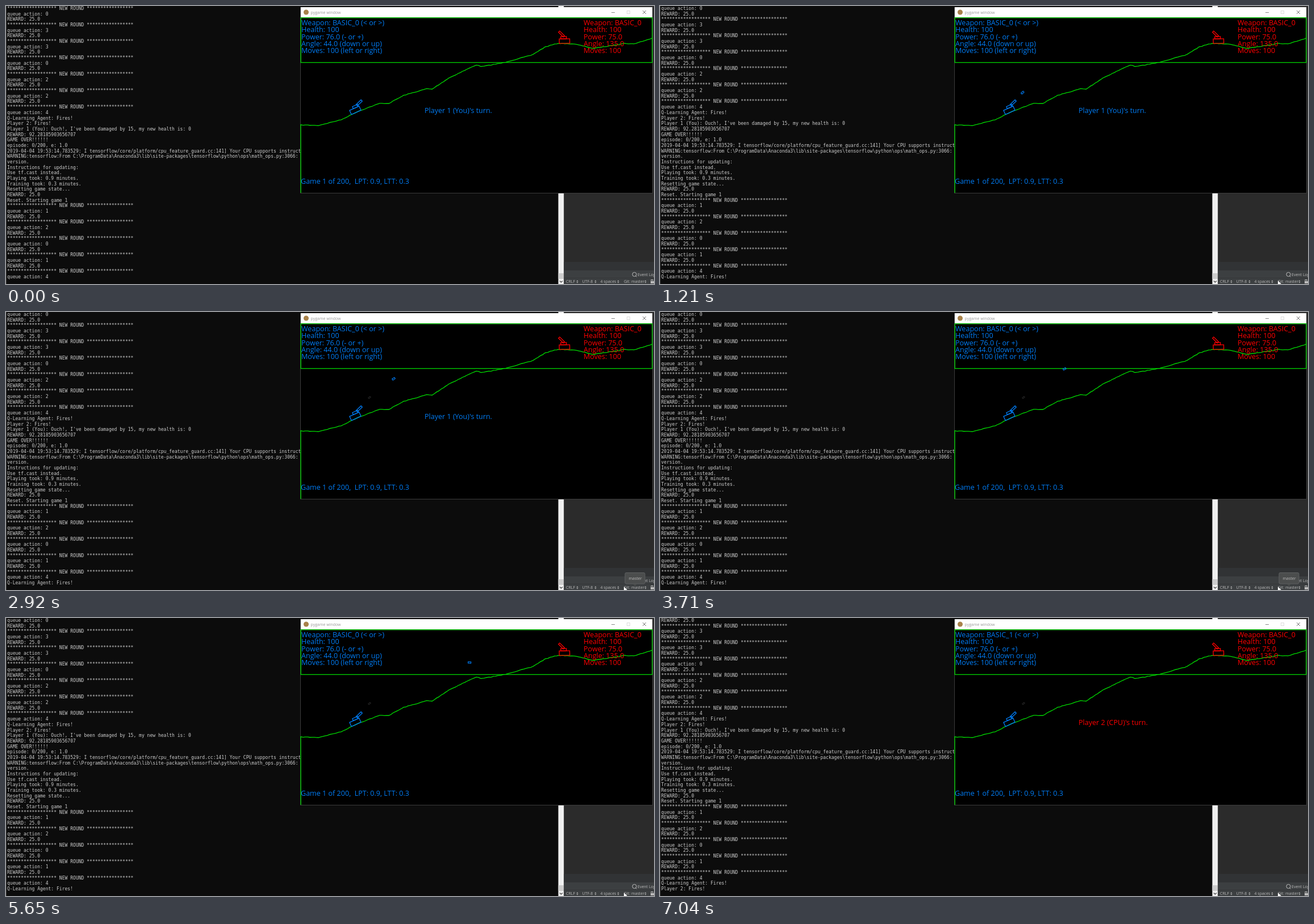
Write an HTML page with a canvas that moves like this. It is 1141 by 491 pixels and loops after 8000 ms.

```html
<!DOCTYPE html>
<html>
<head>
<meta charset="utf-8">
<style>
  html, body { margin: 0; width: 100%; height: 100%; overflow: hidden; background: #0c0c0c; }
  canvas { display: block; }
</style>
</head>
<body>
<canvas id="stage" width="1141" height="491"></canvas>
<script>
const ctx = document.getElementById('stage').getContext('2d');
const LOOP = 8000, STEP = 77.5;
const BLUE = '#007cf4', RED = '#ff0000', GREEN = '#00d800', INK = '#bbbbbb';
const MONO = '8.04px "DejaVu Sans Mono", monospace';
const GAME = '500 12.55px "Open Sans", sans-serif';
const UI = '7px "Open Sans", sans-serif';

const REWARD = 'REWARD: 25.0';
const BANNER = '*'.repeat(18) + ' NEW ROUND ' + '*'.repeat(17);
const start = action => [BANNER, 'queue action: ' + action];
const rounds = actions => actions.flatMap(a => [...start(a), REWARD]);
const log = [
  ...rounds([0, 3, 3, 0, 2, 2]),
  ...start(4),
  'Q-Learning Agent: Fires!',
  'Player 2: Fires!',
  "Player 1 (You): Ouch!, I've been damaged by 15, my new health is: 0",
  'REWARD: 92.28185903656707',
  'GAME OVER!!!!!!',
  'episode: 0/200, e: 1.0',
  '2019-04-04 19:53:14.783529: I tensorflow/core/platform/cpu_feature_guard.cc:141] Your CPU supports instruct',
  'WARNING:tensorflow:From C:\\ProgramData\\Anaconda3\\lib\\site-packages\\tensorflow\\python\\ops\\math_ops.py:3066:',
  'version.',
  'Instructions for updating:',
  'Use tf.cast instead.',
  'Playing took: 0.9 minutes.',
  'Training took: 0.3 minutes.',
  'Resetting game state...',
  REWARD,
  'Reset. Starting game 1',
  ...rounds([1, 2, 0, 1]),
  ...start(4),
  'Q-Learning Agent: Fires!',
  'Player 2: Fires!'
];

// Hillside: a few bends joined by slightly rough slopes
const bends = [
  [519, 210], [550, 211], [590, 201], [620, 186], [658, 172], [674, 172], [700, 158],
  [741, 146], [750, 147], [780, 127], [828, 104], [838, 107], [872, 101], [925, 87],
  [950, 72], [972, 66], [1000, 67], [1035, 75], [1088, 66], [1105, 67], [1138, 57]
];

function makeTerrain() {
  const points = [];
  let seed = 7;
  const random = () => (seed = seed * 16807 % 2147483647) / 2147483647;
  for (let i = 1; i < bends.length; i++) {
    const [x0, y0] = bends[i - 1], [x1, y1] = bends[i];
    for (let x = x0; x < x1; x += 4) {
      points.push(x, y0 + (y1 - y0) * (x - x0) / (x1 - x0) + random() - 0.5);
    }
  }
  return [...points, ...bends.at(-1)];
}
const terrain = makeTerrain();

function shellX(step) {
  const s = step * STEP / 1000;
  return 627 + 11.3 * s + 4.14 * s * s + 0.135 * s ** 3;
}

const shellY = x => 153 - 0.7095 * (x - 638.3) + 0.002803 * (x - 638.3) * (x - 712.3);

function rect(x, y, w, h, fill) {
  ctx.fillStyle = fill;
  ctx.fillRect(x, y, w, h);
}

function text(str, x, y, fill, font) {
  ctx.font = font;
  ctx.fillStyle = fill;
  ctx.fillText(str, x, y);
}

function trace(points) {
  ctx.beginPath();
  for (let i = 0; i < points.length; i += 2) ctx.lineTo(points[i], points[i + 1]);
}

function line(points, color, width = 1) {
  trace(points);
  ctx.strokeStyle = color;
  ctx.lineWidth = width;
  ctx.stroke();
}

function shape(points, fill) {
  trace(points);
  ctx.fillStyle = fill;
  ctx.fill();
}

// Outlined box placed relative to a rotated origin
function box(ox, oy, angle, x, y, w, h, color, width = 1.3) {
  ctx.save();
  ctx.translate(ox, oy);
  ctx.rotate(angle);
  ctx.strokeStyle = color;
  ctx.lineWidth = width;
  ctx.strokeRect(x, y, w, h);
  ctx.restore();
}

function tank(x, y, tilt, turret, px, py, aim, color) {
  box(x, y, tilt, -9.2, -4, 18.4, 8, color);
  box(x, y, tilt, turret - 5, -8, 10, 4, color);
  box(px, py, aim, 0.5, -1.5, 12, 3, color);
}

function drawConsole(shift) {
  rect(0, 0, 1141, 491, '#0c0c0c');
  rect(0, 0, 1, 491, '#3a3a3a');
  for (let i = 0; i < 50; i++) text(log[i + shift], 2, 7 + i * 9.675, '#cccccc', MONO);
  rect(972.5, 0, 10, 491, '#f0f0f0');
  rect(972.5, 472, 10, 10, '#cdcdcd');
  line([975, 485.5, 977.5, 488, 980, 485.5], '#404040', 1.2);
}

function drawStatus(label, x, arrow) {
  text(label, x, 489.3, INK, UI);
  shape([arrow - 1.6, 486.2, arrow, 484.2, arrow + 1.6, 486.2], INK);
  shape([arrow - 1.6, 487.4, arrow, 489.4, arrow + 1.6, 487.4], INK);
}

function drawEditor(tip, pointer) {
  rect(982.5, 0, 158.5, 491, '#2b2b2b');
  rect(982.5, 452, 158.5, 15, '#313335');
  rect(982.5, 467, 158.5, 24, '#3c3f41');
  rect(982.5, 480, 158.5, 1, '#343638');
  ctx.strokeStyle = INK;
  ctx.lineWidth = 1;
  ctx.beginPath();
  ctx.arc(1106.5, 474, 3.6, 0, 7);
  ctx.stroke();
  line([1108.5, 476.5, 1110.5, 478.5], INK);
  text('Event Log', 1112, 476.7, INK, UI);
  drawStatus('CRLF', 986, 1006);
  drawStatus('UTF-8', 1014.5, 1038);
  drawStatus('4 spaces', 1046.5, 1078);
  drawStatus('Git: master', 1088, 1126);
  rect(1135, 486, 6, 4, INK);
  box(1136, 483.5, 0, 0, 0, 3, 3, INK, 1);
  if (tip) {
    ctx.beginPath();
    ctx.roundRect(1090, 460.5, 35, 19.5, 2);
    ctx.fillStyle = '#4b4d4d';
    ctx.fill();
    ctx.strokeStyle = '#5f6162';
    ctx.stroke();
    shape([1103.5, 480, 1107.5, 484, 1111.5, 480], '#4b4d4d');
    text('master', 1096.5, 472.6, INK, UI);
  }
  if (pointer) shape([1088, 485, 1088, 494, 1090, 492, 1092, 492, 1094, 491], '#ffffff');
}

function drawWindow() {
  rect(518, 2, 621, 329, '#3c3c3c');
  rect(519, 2, 619, 18, '#ffffff');
  rect(519, 20, 619, 310, '#000000');
  ctx.beginPath();
  ctx.arc(528.5, 11, 4.5, 0, 7);
  ctx.fillStyle = '#a8824a';
  ctx.fill();
  text('pygame window', 536.5, 14, '#999999', UI);
  line([1066, 11.5, 1072, 11.5], '#888888');
  box(1093.5, 8.5, 0, 0, 0, 5, 5, '#dddddd', 1);
  line([1121, 8, 1127, 14], '#777777');
  line([1127, 8, 1121, 14], '#777777');
}

function drawStats(x, color, weapon, power, angle, hints = []) {
  const rows = ['Weapon: ' + weapon, 'Health: 100', 'Power: ' + power, 'Angle: ' + angle, 'Moves: 100'];
  rows.forEach((row, i) => text(row + (hints[i] || ''), x, 34.3 + i * 12.1, color, GAME));
}

function drawGame(t, step) {
  const over = step >= 82;
  box(519.2, 20.8, 0, 0, 0, 618.6, 79, GREEN);
  line([519.2, 330, ...terrain], GREEN, 1.3);
  drawStats(520, BLUE, over ? 'BASIC_1' : 'BASIC_0', '76.0', '44.0',
    [' (< or >)', '', ' (- or +)', ' (down or up)', ' (left or right)']);
  drawStats(1017, RED, 'BASIC_0', '75.0', '135.0');
  if (over) text("Player 2 (CPU)'s turn.", 737, 189.2, RED, GAME);
  else if (t < 3400) text("Player 1 (You)'s turn.", 737, 189.2, BLUE, GAME);
  text('Game 1 of 200,  LPT: 0.9, LTT: 0.3', 519, 313.8, BLUE, GAME);

  tank(615, 184.2, -0.42, 3, 617.2, 175.5, -0.768, BLUE);
  tank(983.4, 62, -0.02, -1.5, 982.7, 54, -2.356, RED);

  if (step > 10) box(640, 151, -0.7, -2, -1, 4, 2, '#262626', 1);
  if (step >= 0 && step <= 80) {
    const x = shellX(step), y = shellY(x);
    box(x, y, Math.atan(shellY(x + 0.5) - shellY(x - 0.5)), -2.5, -1.3, 5, 2.6, BLUE, 1.1);
  }
}

function draw(t) {
  const step = Math.floor((t - 435) / STEP);
  drawConsole(t < 150 ? 0 : step < 85 ? 1 : 2);
  drawEditor(t >= 1600 && t < 5400, t >= 150);
  drawWindow();
  drawGame(t, step);
}

const origin = performance.now();
function tick() {
  draw((performance.now() - origin) % LOOP);
  requestAnimationFrame(tick);
}
tick();
</script>
</body>
</html>
```
